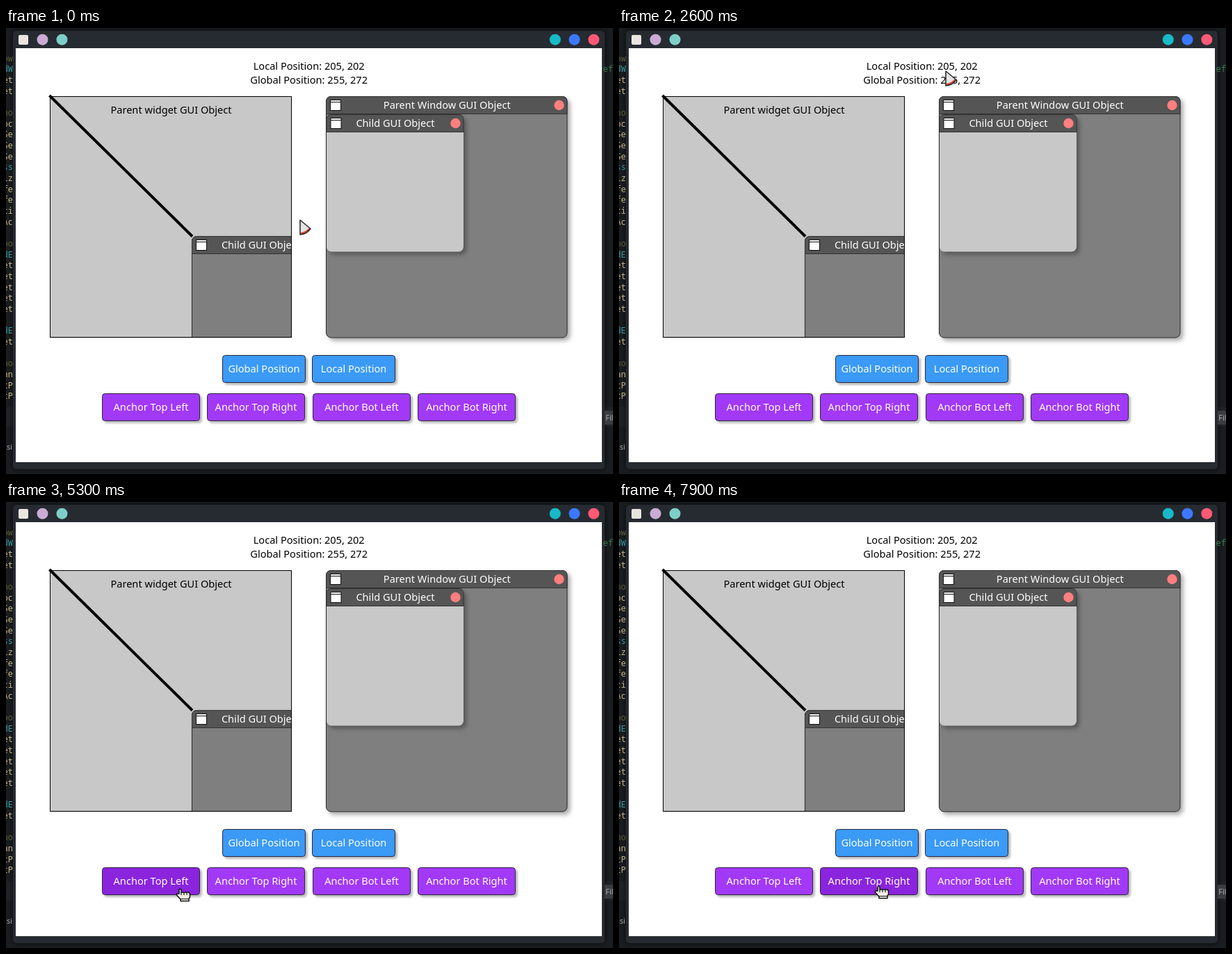
Animation of 873 by 641 pixels, one loop 8 s. Source, as an HTML page:

```html
<!DOCTYPE html>
<html lang="en">
<head>
<meta charset="utf-8">
<title>GUI positions</title>
<style>
  html, body { margin: 0; width: 100%; height: 100%; overflow: hidden; background: #1b1e20; }
  svg { display: block; }
  text { font: 14.6px "Noto Sans", sans-serif; text-anchor: middle; }
  .code { font: 12px "Noto Sans Mono", monospace; text-anchor: end; }
  .button rect { stroke: #2c2440; filter: drop-shadow(3px 3px 1.5px #0004); }
  .blue { fill: #3a9af6; }
  .purple { fill: #a139f6; }
  .hover .purple { fill: #8a24dd; }
  .pressed .purple { fill: #741bbd; }
  .shadow { filter: drop-shadow(4px 4px 3px #0005); }
</style>
</head>
<body>
<svg id="stage" width="873" height="641" viewBox="0 0 873 641"></svg>
<script>
const stage = document.getElementById('stage');

const rect = (x, y, w, h, fill, more = '') =>
  `<rect x="${x}" y="${y}" width="${w}" height="${h}" fill="${fill}" ${more}/>`;
const dot = (x, y, r, fill) => `<circle cx="${x}" cy="${y}" r="${r}" fill="${fill}"/>`;
const label = (x, y, text, fill = '#000') => `<text x="${x}" y="${y}" fill="${fill}">${text}</text>`;

function guiWindow(x, y, size, title, body, outline = '#2a2a2a') {
  const r = 7;
  return `<g class="shadow">${rect(x, y, size, size, body, `stroke="${outline}" rx="${r}"`)}</g>
    <path d="M${x} ${y + 25}V${y + r}q0-${r} ${r}-${r}H${x + size - r}q${r} 0 ${r} ${r}V${y + 25}z"
      fill="#555" stroke="#333"/>
    ${rect(x + 6, y + 5, 15, 15, '#fff', 'stroke="#111"')}
    <path d="M${x + 6} ${y + 8}h15" stroke="#111"/>
    ${dot(x + size - 11.5, y + 12.5, 7.2, '#ff7f7f')}
    ${label(x + size / 2 + .5, y + 17.5, title, '#fff')}`;
}

function button(x, y, w, text, color) {
  return `<g class="button"><rect class="${color}" x="${x}" y="${y}" width="${w}" height="39" rx="4"/>
    ${label(x + w / 2, y + 24.5, text, '#fff')}</g>`;
}

// Editor visible behind the window: only line ends show.
const codeLines = ('ow dW et et - ho oc Se Se Se ss iz fe fe ci Ac - oo dE et et et et et - ' +
  'dE et - ho an tP tP').split(' ');
const codeColor = s => /^(ow|ho|oo)$/.test(s) ? '#5d5e38' : /^(d|ss)/.test(s) ? '#3a9ba3' : '#c4b38c';
const code = codeLines.map((s, i) => s === '-' ? '' :
  `<text class="code" x="10" y="${47.5 + i * 15.67}" fill="${codeColor(s)}">${s}</text>`).join('');

const anchors = ['Top Left', 'Top Right', 'Bot Left', 'Bot Right'];
const anchorWidth = 140;
const anchorX = i => Math.round(138 + i * 151.4) + .5;

stage.innerHTML = `
  <clipPath id="panel">${rect(64, 99, 346, 346, '#000')}</clipPath>
  ${rect(0, 0, 873, 641, '#1b1e20')}
  ${rect(0, 545, 873, 28, '#212426')}
  <g style="filter:drop-shadow(0 0 4px #000b)">${rect(10, 4, 851, 630, '#262b31', 'rx="5"')}</g>
  ${code}
  <text x="9" y="606" fill="#aaa" style="font-size:11px;text-anchor:end">ssi</text>
  <text class="code" x="873" y="63" fill="#3a7a50">ef</text>
  ${rect(861, 550, 12, 20, '#3a3d40')}
  <text x="868" y="564" fill="#aaa" style="font-size:11px">Fil</text>
  ${rect(14, 29, 843, 595, '#fff')}
  ${rect(18, 10, 14, 14, '#e9e6df', 'rx="2"')}
  ${dot(52.5, 16.7, 8, '#cbabd4')}${dot(80.5, 16.7, 8, '#7ccfc8')}
  ${dot(789.8, 16.7, 8, '#17bac8')}${dot(817.5, 16.7, 8, '#3c78ff')}${dot(845.3, 16.7, 8, '#ff5975')}
  ${label(435.7, 60, 'Local Position: 205, 202')}
  ${label(435.7, 80, 'Global Position: 255, 272')}
  ${rect(63.5, 98.5, 347, 347, '#c8c8c8')}
  <g clip-path="url(#panel)">${guiWindow(267.5, 299.5, 197, 'Child GUI Object', '#7f7f7f')}</g>
  ${rect(63.5, 98.5, 347, 346, 'none', 'stroke="#000"')}
  ${label(237.5, 123, 'Parent widget GUI Object')}
  <path d="M62.5 97L268 299.5" stroke="#000" stroke-width="4"/>
  ${guiWindow(460.5, 98.5, 346.5, 'Parent Window GUI Object', '#7f7f7f')}
  ${guiWindow(461, 124.5, 197, 'Child GUI Object', '#c8c8c8', 'none')}
  ${button(311.5, 470.5, 119, 'Global Position', 'blue')}
  ${button(440.5, 470.5, 119, 'Local Position', 'blue')}
  ${anchors.map((a, i) => button(anchorX(i), 525.5, anchorWidth, 'Anchor ' + a, 'purple')).join('')}
  <g id="arrow" stroke-linejoin="round">
    <path d="M1 1V22Q11 21 16 13.5Z" fill="#e4e4e4"/>
    <path d="M1.5 19Q9 18 13.5 12.5L16 13.5Q11 21 1.5 22Z" fill="#d9442f"/>
    <path d="M1 1V22Q11 21 16 13.5Z" fill="none" stroke="#2d2d2d" stroke-width="1.6"/>
  </g>
  <g id="hand" stroke="#111" stroke-width="1.5" stroke-linejoin="round">
    <path d="M-1 8V2Q0 .5 2 2V6H13L14.5 8V13L13 15V18.5H1V16L-4.5 10V8Z" fill="#f1ede6"/>
    <path d="M2 6V10M6 6V10M10 6V10M1 15.5H13" fill="none" stroke-width="1.2"/>
  </g>`;

// Pointer strokes: begin, end, target point and, for bent ones, a control point
const origin = [422, 275];
const strokes = [
  [100, 900, [350, 53], [530, -48]],
  [1000, 1300, [358, 56], [360, 53]],
  [1400, 1600, [355, 59]],
  [1700, 2400, [440, 61], [395, 67]],
  [2500, 3100, [524, 61], [536, 61]],
  [3300, 3600, [79, 394]],
  [3600, 4200, [152, 558], [78, 520]],
  [4200, 4400, [160, 558]],
  [4500, 5300, [250, 555], [168, 556]],
  [5800, 6400, [302, 552], [268, 556]],
  [6700, 7500, [418, 552]],
  [7700, 7900, [373, 551]]
];

function pointerAt(t) {
  let at = origin;
  for (const [begin, end, to, bend] of strokes) {
    if (t <= begin) break;
    const k = Math.min(1, (t - begin) / (end - begin));
    at = at.map((a, i) => {
      const c = bend ? bend[i] : (a + to[i]) / 2;
      return a * (1 - k) ** 2 + 2 * c * k * (1 - k) + to[i] * k * k;
    });
  }
  return at.map(Math.round);
}

const arrow = document.getElementById('arrow');
const hand = document.getElementById('hand');
const anchorButtons = [...stage.querySelectorAll('.purple')].map(r => r.parentNode);
const start = performance.now();

function draw() {
  const t = Math.floor((performance.now() - start) % 8000 / 100) * 100;
  const [x, y] = pointerAt(t);
  const over = y >= 525 && y < 565
    ? anchors.findIndex((_, i) => x >= anchorX(i) && x < anchorX(i) + anchorWidth) : -1;
  const pressed = t === 5500;
  anchorButtons.forEach((b, i) =>
    b.setAttribute('class', 'button' + (i !== over ? '' : pressed ? ' pressed' : ' hover')));
  for (const [cursor, shown] of [[arrow, over < 0], [hand, over >= 0]]) {
    cursor.setAttribute('visibility', shown ? 'visible' : 'hidden');
    cursor.setAttribute('transform', `translate(${x} ${y})`);
  }
  requestAnimationFrame(draw);
}
draw();
</script>
</body>
</html>
```
